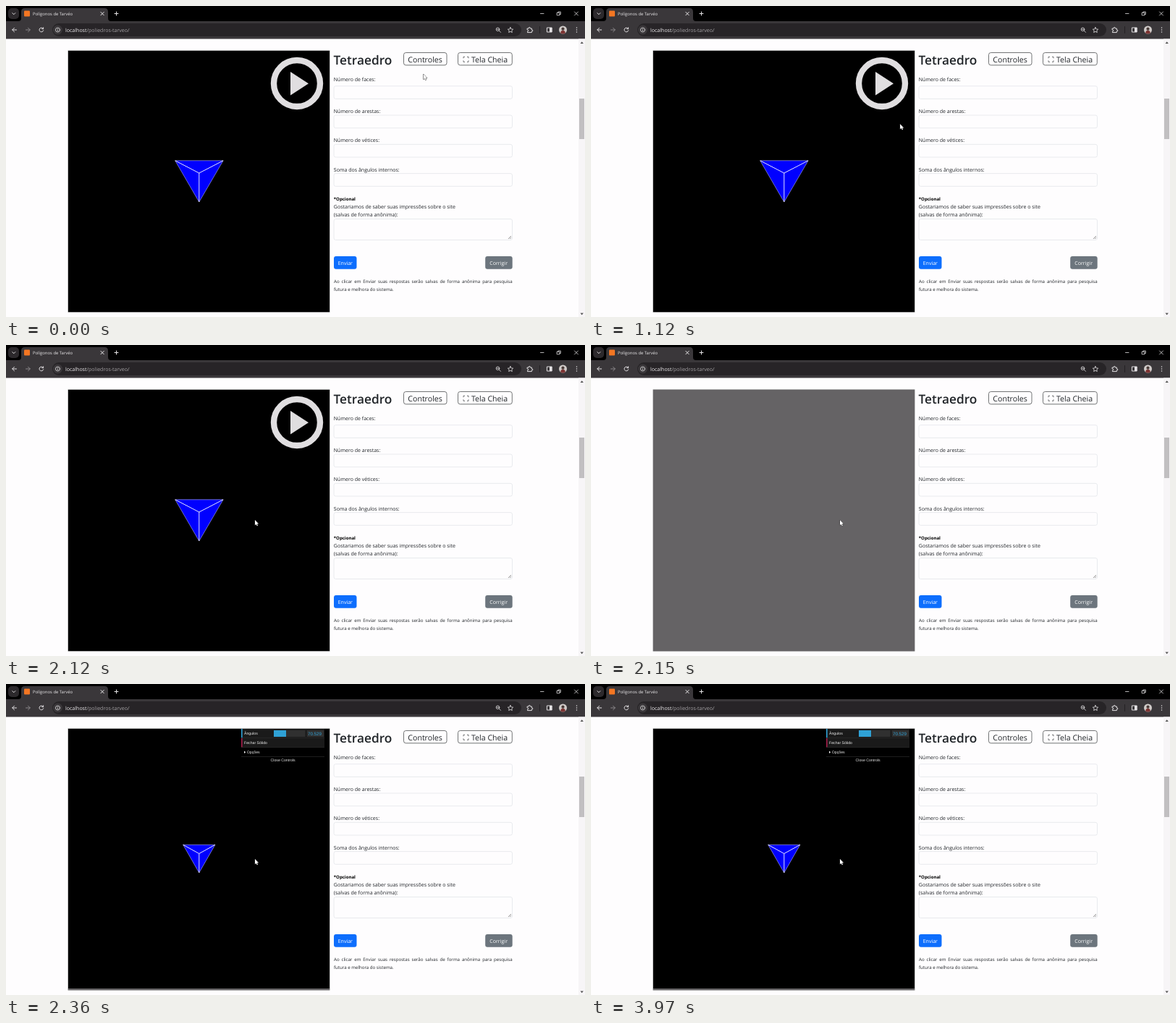
Recreate the animation shown at these times as an HTML page. Size 800x430 px, loop 4000 ms.

```html
<!DOCTYPE html>
<html lang="pt">
<head>
<meta charset="utf-8">
<title>Polígonos de Tarvéo</title>
<style>
html, body { margin: 0; width: 100%; height: 100%; overflow: hidden; background: #fefdfe; }
svg { position: absolute; left: 0; top: 0; }
svg, p { font: 7.04px "Open Sans", "Noto Sans", sans-serif; text-rendering: geometricPrecision; }
p { position: absolute; left: 453px; top: 375px; width: 246.6px; margin: 0;
    font-size: 6.15px; line-height: 11.4px; text-align: justify; color: #212529; }
.line { fill: none; stroke: #e3e1e3; stroke-linecap: round; stroke-linejoin: round; }
.field rect { fill: #fefdfe; stroke: #e4e6ea; stroke-width: .8; }
.gui { font: 5.2px "Liberation Sans", Arial, sans-serif; fill: #eee; }
.face { fill: #00f; stroke: #b4b4ff; stroke-width: .6; stroke-linejoin: round; }
.edge { fill: none; stroke: #fff; stroke-width: .9; }
</style>
</head>
<body>
<svg width="800" height="430" viewBox="0 0 800 430">
  <!-- browser frame -->
  <path d="M0 0H800V45H0z"/>
  <path d="M0 21H17Q21 21 21 17V8Q21 3 26 3H136Q141 3 141 8V17Q141 21 145 21H800V45.5H0z" fill="#3a373a"/>
  <rect x="3" y="3" width="15" height="15" rx="5" fill="#2c292c"/>
  <rect x="64" y="24" width="648" height="18" rx="9" fill="#272427"/>
  <rect x="25" y="6.5" width="8" height="8" rx="1" fill="#f37623"/>
  <circle cx="71.5" cy="33" r="6.5" fill="#3a373a"/>
  <g class="line">
    <path d="M8.8 9.7l2 2 2-2M130.9 8.4l4.4 4.4m0-4.4l-4.4 4.4M152.5 8v5m-2.5-2.5h5"/>
    <path d="M14.5 33H8.8m2.7-2.8L8.7 33l2.8 2.8"/>
    <path d="M27.5 33h5.7m-2.7-2.8l2.8 2.8-2.8 2.8" stroke="#8a878a"/>
    <path d="M51.3 31.3A2.9 2.9 0 1 0 51.7 33.8M51.6 29.8v1.9h-1.9"/>
    <g stroke-width=".8">
      <circle cx="71.5" cy="33" r="3"/>
      <path d="M71.5 33v1.4m0-3v.1"/>
      <circle cx="679.5" cy="32.3" r="2.3"/>
      <path d="M681.3 34.1l2.2 2.3M678.4 32.3h2.2"/>
      <path d="M697 29.5l1.1 2.4 2.6.3-1.9 1.8.5 2.6-2.3-1.3-2.3 1.3.5-2.6-1.9-1.8 2.6-.3z"/>
      <path d="M738.5 10.5h4.5M761.5 9.3h3.5v3.5h-3.5zM762.8 9.2V8h3.5v3.5h-1.2M785.5 8l5 5m0-5l-5 5"/>
    </g>
    <path d="M720.5 31h1.8q-.2-1.6 1-1.6t1 1.6h2v2q1.6-.2 1.6 1t-1.6 1v1.6h-5.8v-1.5q1.4-.1 1.4-1.1t-1.4-1.1z"/>
    <path d="M747.8 30h6.4v6h-6.4z"/>
    <path d="M737.5 28.5v9" stroke="#242124"/>
  </g>
  <path d="M751 30h3.2v6H751z" fill="#e3e1e3"/>
  <circle cx="769.5" cy="33" r="5.5" fill="#d0cbc9"/>
  <path d="M766.2 37.4q0-3.6 3.3-3.6t3.3 3.6q-3.3 2.2-6.6 0z" fill="#7d3433"/>
  <circle cx="769.5" cy="31.7" r="2.1" fill="#493b38"/>
  <path d="M788.5 30v.1m0 2.9v.1m0 2.9v.1" class="line" stroke-width="1.5"/>
  <text x="37" y="12.7" font-size="5.9" fill="#e8e6e8">Polígonos de Tarvéo</text>
  <text x="82" y="35.7" fill="#eeecee">localhost<tspan fill="#a5a2a5">/poliedros-tarveo/</tspan></text>

  <!-- scrollbar -->
  <path d="M791 45.5h9V430h-9z" fill="#f7f5f7"/>
  <path d="M792 128h7v56h-7z" fill="#c1bfc1"/>
  <path d="M793.5 52l2.2-2.7 2.2 2.7zM793.5 424.5l2.2 2.7 2.2-2.7z" fill="#555"/>

  <!-- form -->
  <g fill="#212529">
    <text x="452.5" y="80.6" font-size="17.3" font-weight="600">Tetraedro</text>
    <g font-size="10.6">
      <text x="555.3" y="77.5">Controles</text>
      <text x="643" y="77.5">Tela Cheia</text>
    </g>
    <g fill="none" stroke="#505254" stroke-width=".8">
      <rect x="549.5" y="64.5" width="59.5" height="17.3" rx="3"/>
      <rect x="624.5" y="64.5" width="74.8" height="17.3" rx="3"/>
      <path d="M632 72.3v-2h2m3 0h2v2m0 3v2h-2m-3 0h-2v-2"/>
    </g>
    <text x="452.8" y="104">Número de faces:</text>
    <text x="452.8" y="148.3">Número de arestas:</text>
    <text x="452.8" y="188.3">Número de vétices:</text>
    <text x="452.8" y="228.6">Soma dos ângulos internos:</text>
    <text x="452.8" y="269" font-size="6.05" font-weight="700" fill="#000">*Opcional</text>
    <text x="452.8" y="280.2">Gostariamos de saber suas impressões sobre o site</text>
    <text x="452.8" y="291.3">(salvas de forma anônima):</text>
  </g>
  <g class="field">
    <rect x="453" y="110.7" width="246.5" height="17.7" rx="2.5"/>
    <rect x="453" y="151" width="246.5" height="17.7" rx="2.5"/>
    <rect x="453" y="191.3" width="246.5" height="17.7" rx="2.5"/>
    <rect x="453" y="231.6" width="246.5" height="17.7" rx="2.5"/>
    <rect x="453" y="294.5" width="246.5" height="29" rx="2.5"/>
  </g>
  <path d="M694 322l4-4m-1.8 4l1.8-1.8" stroke="#666" stroke-width=".7"/>
  <rect x="453" y="346" width="31.5" height="17.7" rx="3" fill="#0d6efd"/>
  <rect x="662.2" y="346" width="37.5" height="17.7" rx="3" fill="#6c757d"/>
  <g fill="#fff">
    <text x="458.7" y="357.5">Enviar</text>
    <text x="668.3" y="357.5">Corrigir</text>
  </g>

  <!-- viewer: poster, loading grey, live scene -->
  <path d="M85.6 61.6h361.8v361.8H85.6z" fill="#656365"/>
  <g id="poster">
    <path d="M86 62h361v361H86z"/>
    <circle cx="402" cy="107" r="32" fill="none" stroke="#e0dee0" stroke-width="8.4"/>
    <path d="M393 91v32.5l25-16.2z" fill="#e0dee0"/>
    <path class="face" d="M233.7 213.8h66.4L266.8 271z"/>
    <path class="edge" d="M233.7 213.8l33.1 17.2 33.3-17.2M266.8 231v40"/>
  </g>
  <g id="scene" class="gui">
    <path d="M86 62h361v359H86z" fill="#000"/>
    <path class="face" d="M244.7 222.3h44.2L266.8 261z"/>
    <path class="edge" d="M244.7 222.3l22.1 12.2 22.1-12.2M266.8 234.5V261"/>
    <path d="M325 62h115v25.7H325z" fill="#1a1a1a"/>
    <path d="M325 74.6h115M325 87.6h115M325 100.5h115" stroke="#2c2c2c" stroke-width=".7"/>
    <path d="M325 62h1.6v12.3H325z" fill="#2fa1d6"/>
    <path d="M325 75h1.6v12.3H325z" fill="#a51c49"/>
    <path d="M370 64h43.5v9H370zM415.7 64H439v9h-23.3z" fill="#303030"/>
    <path d="M370 64h17v9h-17z" fill="#2fa1d6"/>
    <text x="417" y="70.8" font-size="6.2" fill="#2fa1d6">70.529</text>
    <text x="329" y="70">Ângulos</text>
    <text x="329" y="83">Fechar Sólido</text>
    <path d="M329 92.5l2.2 1.7-2.2 1.7z"/>
    <text x="332.8" y="96">Opções</text>
    <text x="365.5" y="107">Close Controls</text>
  </g>

  <path id="cursor" d="M0 0V7.2L1.7 5.7 2.8 8.2 3.9 7.7 2.8 5.3H5z"
        fill="#fff" stroke="#222" stroke-width=".9" paint-order="stroke"/>
</svg>
<p>Ao clicar em Enviar suas respostas serão salvas de forma anônima para pesquisa futura e melhora do sistema.</p>
<script>
const [poster, scene, cursor] = ["poster", "scene", "cursor"].map(id => document.getElementById(id));
const show = (el, on) => el.style.display = on ? "" : "none";
const bezier = (a, b, c, k) => (1 - k) ** 2 * a + 2 * k * (1 - k) * b + k * k * c;

function draw() {
  const t = performance.now() % 4000;
  const u = Math.min(1, Math.max(0, (t - 890) / 440));
  const k = u * u * (3 - 2 * u);
  const x = bezier(576.8, 411, 344, k), y = bezier(94.3, 147, 242, k);
  cursor.setAttribute("transform", `translate(${x} ${y})`);
  show(poster, t < 2150);
  show(scene, t >= 2360);
  requestAnimationFrame(draw);
}
draw();
</script>
</body>
</html>
```
